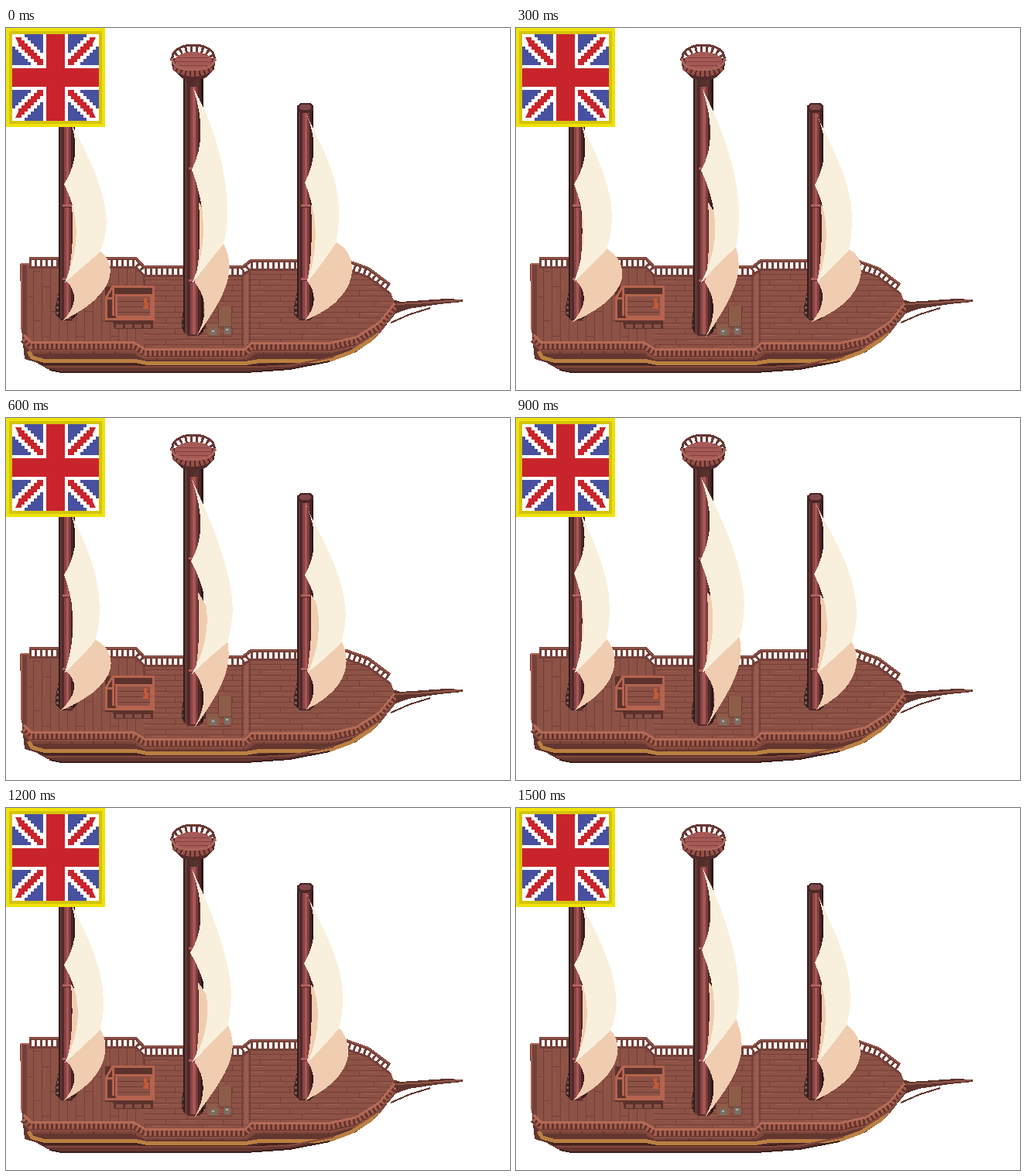
An HTML page without scripts for the animation above (1.65 s loop, 651 by 468 pixels).

```html
<!DOCTYPE html>
<html lang="en">
<head>
<meta charset="utf-8">
<title>Sailing ship</title>
<style>
html, body { margin: 0; width: 100%; height: 100%; overflow: hidden; background: #fff; }
svg { display: block; width: 651px; height: 468px; shape-rendering: crispEdges; }
.line { fill: none; }
.cloth { fill: #f8f0dc; }
.fold { fill: #f0cdb0; }
/* poses lie 300 ms apart, each with one in-between; the last holds 150 ms */
.cloth, .fold { animation: 1650ms steps(2, end) infinite; }
#a .cloth { animation-name: a-cloth; }
#a .fold { animation-name: a-fold; }
#b .cloth { animation-name: b-cloth; }
#b .fold { animation-name: b-fold; }
#c .cloth { animation-name: c-cloth; }
#c .fold { animation-name: c-fold; }

@keyframes a-cloth {
  0%, 100% { d: path("M79 111C90 140 128 195 130 250Q129 274 121 290Q104 305 76 329Q106 262 75 202Q102 160 79 111Z"); }
  18.182% { d: path("M79 111C90 140 122 190 124 240Q124 268 117 286Q102 302 75 329Q100 262 75 202Q102 160 79 111Z"); }
  36.364% { d: path("M79 111C90 140 121 190 121 245Q121 270 115 288Q102 305 76 329Q98 262 75 203Q102 160 79 111Z"); }
  54.545% { d: path("M79 111C90 140 121 195 121 245Q121 268 116 287Q102 305 76 329Q99 262 75 201Q100 160 79 111Z"); }
  72.727% { d: path("M79 111C90 140 126 195 126 250Q126 270 121 287Q104 305 76 329Q110 262 75 203Q102 160 79 111Z"); }
  90.909% { d: path("M79 111C90 140 128 195 130 250Q129 272 122 288Q104 305 76 329Q108 262 75 203Q102 160 79 111Z"); animation-timing-function: step-end; }
}
@keyframes a-fold {
  0%, 100% { d: path("M121 288C142 302 148 342 74 378Q100 350 78 327Q89 290 85 228Z"); }
  18.182% { d: path("M117 285C146 302 154 345 73 380Q100 350 78 327Q89 290 84 228Z"); }
  36.364% { d: path("M115 286C145 302 152 345 69 379Q102 350 78 327Q90 290 84 228Z"); }
  54.545% { d: path("M116 285C134 302 138 345 76 378Q100 350 78 327Q89 290 84 228Z"); }
  72.727% { d: path("M121 285C133 302 138 345 75 378Q100 350 78 327Q89 290 84 228Z"); }
  90.909% { d: path("M122 287C138 302 141 345 74 378Q100 350 78 327Q90 290 85 228Z"); animation-timing-function: step-end; }
}
@keyframes b-cloth {
  0%, 100% { d: path("M242 78C262 110 287 180 286 240Q286 262 281 279Q262 302 240 331Q270 262 240 183Q262 140 242 78Z"); }
  18.182% { d: path("M241 79C258 112 288 180 288 240Q288 265 284 284Q262 302 238 331Q276 262 239 184Q262 145 241 79Z"); }
  36.364% { d: path("M240 79C256 115 290 185 293 245Q292 270 286 290Q266 306 240 331Q280 262 239 185Q263 145 240 79Z"); }
  54.545% { d: path("M239 77C258 112 294 185 295 240Q294 268 288 284Q266 304 240 331Q270 262 238 184Q262 140 239 77Z"); }
  72.727% { d: path("M240 79C256 112 289 185 291 240Q290 265 286 282Q266 302 239 331Q282 262 238 187Q264 145 240 79Z"); }
  90.909% { d: path("M241 78C260 112 288 185 288 240Q288 258 284 274Q262 304 240 331Q272 262 240 184Q262 140 241 78Z"); animation-timing-function: step-end; }
}
@keyframes b-fold {
  0%, 100% { d: path("M281 278C299 315 284 345 246 399Q268 360 244 329Q253 290 249 225Z"); }
  18.182% { d: path("M284 283C292 310 291 335 244 401Q266 360 244 329Q252 290 248 225Z"); }
  36.364% { d: path("M286 288C291 315 288 340 243 401Q267 360 244 329Q252 290 248 225Z"); }
  54.545% { d: path("M288 282C297 315 282 345 246 399Q268 360 244 329Q250 290 247 225Z"); }
  72.727% { d: path("M285 278C305 315 285 345 243 401Q266 360 244 329Q252 290 248 225Z"); }
  90.909% { d: path("M284 272C302 315 288 345 244 400Q267 360 244 329Q252 290 249 225Z"); animation-timing-function: step-end; }
}
@keyframes c-cloth {
  0%, 100% { d: path("M388 111C400 140 432 190 430 240Q430 262 426 278Q412 300 389 329Q412 262 386 200Q408 158 388 111Z"); }
  18.182% { d: path("M388 110C400 140 434 195 434 245Q434 268 430 287Q414 304 389 329Q414 262 386 203Q410 158 388 110Z"); }
  36.364% { d: path("M387 111C400 145 437 195 439 255Q438 275 433 290Q414 310 390 329Q420 262 386 203Q410 160 387 111Z"); }
  54.545% { d: path("M387 110C400 140 441 195 440 255Q439 275 433 290Q414 308 390 329Q416 262 385 202Q410 158 387 110Z"); }
  72.727% { d: path("M388 110C400 140 436 195 435 245Q435 268 430 285Q414 304 390 329Q418 262 385 201Q410 158 388 110Z"); }
  90.909% { d: path("M389 110C401 140 433 195 432 245Q432 264 427 281Q412 302 390 329Q412 262 386 200Q408 158 389 110Z"); animation-timing-function: step-end; }
}
@keyframes c-fold {
  0%, 100% { d: path("M426 277C456 290 463 348 386 378Q408 352 389 327Q397 290 394 228Z"); }
  18.182% { d: path("M430 286C454 295 460 350 382 380Q406 352 389 327Q397 290 394 228Z"); }
  36.364% { d: path("M433 288C442 305 452 345 388 377Q406 352 389 327Q396 290 394 228Z"); }
  54.545% { d: path("M433 288C444 305 450 345 388 377Q406 352 389 327Q396 290 393 228Z"); }
  72.727% { d: path("M430 284C448 302 455 345 387 378Q406 352 389 327Q397 290 394 228Z"); }
  90.909% { d: path("M427 280C453 298 460 345 386 378Q408 352 389 327Q397 290 394 228Z"); animation-timing-function: step-end; }
}
</style>
</head>
<body>
<svg viewBox="0 0 651 468">
  <defs>
    <linearGradient id="wood">
      <stop offset=".08" stop-color="#351c1c"/><stop offset=".08" stop-color="#643936"/>
      <stop offset=".2" stop-color="#643936"/><stop offset=".2" stop-color="#4a2a29"/>
      <stop offset=".75" stop-color="#5c3330"/><stop offset=".9" stop-color="#43211f"/>
      <stop offset=".9" stop-color="#301717"/>
    </linearGradient>
    <linearGradient id="spar">
      <stop offset=".15" stop-color="#54292a"/><stop offset=".15" stop-color="#8a4444"/>
      <stop offset=".4" stop-color="#8a4444"/><stop offset=".4" stop-color="#a95757"/>
      <stop offset=".7" stop-color="#a95757"/><stop offset=".7" stop-color="#7c3c3d"/>
      <stop offset=".9" stop-color="#7c3c3d"/><stop offset=".9" stop-color="#47201f"/>
    </linearGradient>
    <pattern id="planks" width="74" height="28" patternUnits="userSpaceOnUse">
      <path class="line" stroke="#753f38" d="M0 3.5H74M0 10.5H74M0 17.5H74M0 24.5H74M12.5 3v7M58.5 10v7M31.5 17v7M70.5 24v4M70.5 0v3"/>
      <path class="line" stroke="#9d5b4e" d="M16 5.5h22M4 12.5h18M40 19.5h20M22 26.5h14"/>
    </pattern>
    <pattern id="boards" width="44" height="64" patternUnits="userSpaceOnUse">
      <path class="line" stroke="#753f38" d="M2.5 0V64M13.5 0V64M24.5 0V64M35.5 0V64M2 14.5h11M13 46.5h11M24 27.5h11M35 58.5h9"/>
      <path class="line" stroke="#985649" d="M5.5 18v22M27.5 32v20M16.5 4v18"/>
    </pattern>
    <path id="back" d="M30 298H168L178 309H306L316 301H440L468 311L496 332"/>
    <path id="front" d="M23 397L32 406H164L179 415H309L318 407H420L452 400L482 381L502 356"/>
    <g id="quarter">
      <path fill="#c9242c" d="M3 3h2v1h1v1h1v1h1v1h1v1h1v1h1v1h1v2h-2v-1h-1v-1h-1v-1h-1v-1h-1v-1h-1v-1h-1v-1z"/>
      <path id="blue" fill="#4850a0" d="M6 2h6v6h-1v-1h-1v-1h-1v-1h-1v-1h-1v-1h-1z"/>
      <use href="#blue" transform="matrix(0 1 1 0 0 0)"/>
    </g>
    <g id="foot">
      <path fill="#3f2725" d="M4 0H24L28 22V30L20 37H7L0 30V20Z"/>
      <path class="line" stroke="#7d605a" stroke-width="3" stroke-dasharray="6 2" d="M3 6H9M2 13H9M1 20H9M1 27H9M22 6H26M21 13H27M20 20H28M20 27H28"/>
    </g>
  </defs>

  <!-- bowsprit -->
  <path fill="#5f352e" d="M496 350L510 354L568 350L590 351V354L560 357L520 363L498 371Z"/>
  <path class="line" stroke="#91574a" stroke-width="2" d="M500 357L530 356L588 352"/>
  <path class="line" stroke="#5f352e" stroke-width="2" d="M497 381L522 370L548 362"/>

  <!-- hull -->
  <path fill="#633630" d="M19 380L24 428L38 432L54 441L72 446H310L366 442L420 431L452 419L478 400L498 374L504 356L450 400H30Z"/>
  <path class="line" stroke="#7c463b" stroke-width="9" stroke-dasharray="26 2" d="M30 416H162L180 424H310L322 416H420L454 408L480 391L500 366"/>
  <path class="line" stroke="#432320" stroke-width="3" d="M32 424L48 434H168L182 437H316L420 428L450 418L474 400"/>
  <path class="line" stroke="#ba8042" stroke-width="5" d="M29 418L34 426L48 430H165L180 433H312L330 430H416L446 419L470 404L482 390"/>
  <path class="line" stroke="#83483c" stroke-width="2" d="M52 438H310L364 437L424 425"/>
  <path class="line" stroke="#3c201e" stroke-width="2" d="M56 442L72 445H310L366 441L418 431"/>

  <!-- deck -->
  <path fill="#8d5246" d="M20 304H30L32 308H168L178 319H306L316 311H440L468 321L497 342L502 356L484 381L452 402L420 408H318L308 416H180L166 408H30L22 398Z"/>
  <path fill="url(#boards)" d="M28 309H168L178 319V414L166 406H30Z"/>
  <path fill="url(#planks)" d="M178 319H306L316 311H440L468 321L497 342L500 356L482 380L450 401L420 406H318L308 414H178Z"/>
  <path fill="#743f37" d="M18 305H27V401L20 392Z"/>
  <path class="line" stroke="#a76352" stroke-width="2" d="M20 390V305H30"/>
  <path class="line" stroke="#70403a" stroke-width="2" d="M305 320V412M315 312V406M178 320V332"/>
  <path fill="#9b5c4e" d="M308 318H313V408L308 412Z"/>

  <!-- rear rail -->
  <g class="line" stroke="#74403a">
    <use href="#back" y="6" stroke-width="9" stroke-dasharray="3 4"/>
    <use href="#back" y="11" stroke-width="3"/>
    <use href="#back" stroke-width="4"/>
    <use href="#back" y="-1" stroke="#a15d4f"/>
  </g>

  <!-- hatch -->
  <path fill="#5b322c" d="M128 334H191V378H190V389H140L138 380H128Z"/>
  <path fill="#8d5246" d="M144 346H186V372H144Z"/>
  <path class="line" stroke="#6a3932" d="M144 353.5H186M144 360.5H186M144 367.5H186"/>
  <path class="line" stroke="#b5634e" stroke-width="3" d="M129 378V349L138 334H190V376H129M138 334V372M129 349H138M142 345H187V373H143Z"/>
  <path class="line" stroke="#875045" stroke-width="5" stroke-dasharray="9 3" d="M142 385H188"/>
  <path fill="#c45a36" d="M178 349h4v6h2v8h-7v-3h2z"/>

  <!-- crate -->
  <path fill="#8d5d49" d="M274 360H291V386H274ZM260 382H276V398H260Z"/>
  <path class="line" stroke="#684035" d="M274.5 360V386H291.5V360M260 398.5H292"/>
  <path fill="#777068" d="M264 389h8v8h-8zM282 387h8v9h-8z"/>
  <path fill="#bbb0a4" d="M266 391h3v2h-3zM284 389h3v2h-3z"/>

  <!-- front rail -->
  <g class="line" stroke="#65352f">
    <use href="#front" y="5" stroke-width="10"/>
    <use href="#front" y="5" stroke="#a45d4c" stroke-width="7" stroke-dasharray="3 3"/>
    <use href="#front" y="11" stroke="#8b4e41" stroke-width="2"/>
    <use href="#front" stroke="#b46a56" stroke-width="3"/>
  </g>

  <!-- masts -->
  <use href="#foot" x="64" y="341"/>
  <use href="#foot" transform="translate(227 352) scale(1.1 1.2)"/>
  <use href="#foot" x="372" y="341"/>
  <path fill="url(#wood)" d="M68 100H89V374L84 377H73L68 374Z"/>
  <path fill="url(#wood)" d="M229 60H255V393L249 398H236L229 393Z"/>
  <path fill="url(#wood)" d="M376 100H397V374L392 377H381L376 374Z"/>
  <path fill="#4a2626" d="M376 101L380 97H393L397 101V106L392 109H381L376 106Z"/>
  <path fill="#82494a" d="M379 101L382 99H391L394 101V104L391 106H382L379 104Z"/>
  <path fill="url(#spar)" d="M73 110H85V376H73Z"/>
  <path fill="url(#spar)" d="M236 76H249V396H236Z"/>
  <path fill="url(#spar)" d="M381 110H393V376H381Z"/>
  <path class="line" stroke="#b5605f" stroke-width="3" d="M73 229H85M73 324H85M236 181H249M236 326H249M381 229H393M381 324H393"/>
  <path class="line" stroke="#50282a" d="M73 231.5H85M73 326.5H85M236 183.5H249M236 328.5H249M381 231.5H393M381 326.5H393"/>

  <!-- crow's nest -->
  <path class="line" stroke="#693936" stroke-width="10" stroke-dasharray="3 4" d="M217 42C218 22 266 22 267 42"/>
  <path class="line" stroke="#693936" stroke-width="3" d="M215 40C213 16 271 16 269 40"/>
  <path fill="#532b2a" d="M213 37L217 39L242 34L267 39L271 37L269 53L258 64L250 67H234L226 64L215 53Z"/>
  <ellipse cx="242" cy="42" rx="24" ry="11" fill="#a65a57"/>
  <path class="line" stroke="#82433f" d="M222 38.5H262M219 43.5H265M224 48.5H260"/>
  <path class="line" stroke="#965149" stroke-width="9" stroke-dasharray="4 2" d="M217 50Q242 67 267 50"/>
  <path class="line" stroke="#ac655b" stroke-width="3" d="M214 39Q216 54 242 54Q268 54 270 39"/>

  <!-- sails -->
  <g id="a"><path class="fold"/><path class="cloth"/></g>
  <g id="b"><path class="fold"/><path class="cloth"/></g>
  <g id="c"><path class="fold"/><path class="cloth"/></g>

  <!-- flag, in cells of 4 px -->
  <g transform="scale(4)">
    <path fill="#f0e208" d="M0 0H32V32H0Z"/>
    <path fill="#d4c40a" d="M1 1H31V31H1Z"/>
    <path fill="#fff" d="M2 2H30V30H2Z"/>
    <use href="#quarter"/>
    <use href="#quarter" transform="matrix(-1 0 0 1 32 0)"/>
    <use href="#quarter" transform="matrix(1 0 0 -1 0 32)"/>
    <use href="#quarter" transform="matrix(-1 0 0 -1 32 32)"/>
    <path fill="#c9242c" d="M13 2H19V13H30V19H19V30H13V19H2V13H13Z"/>
  </g>
</svg>
</body>
</html>
```
